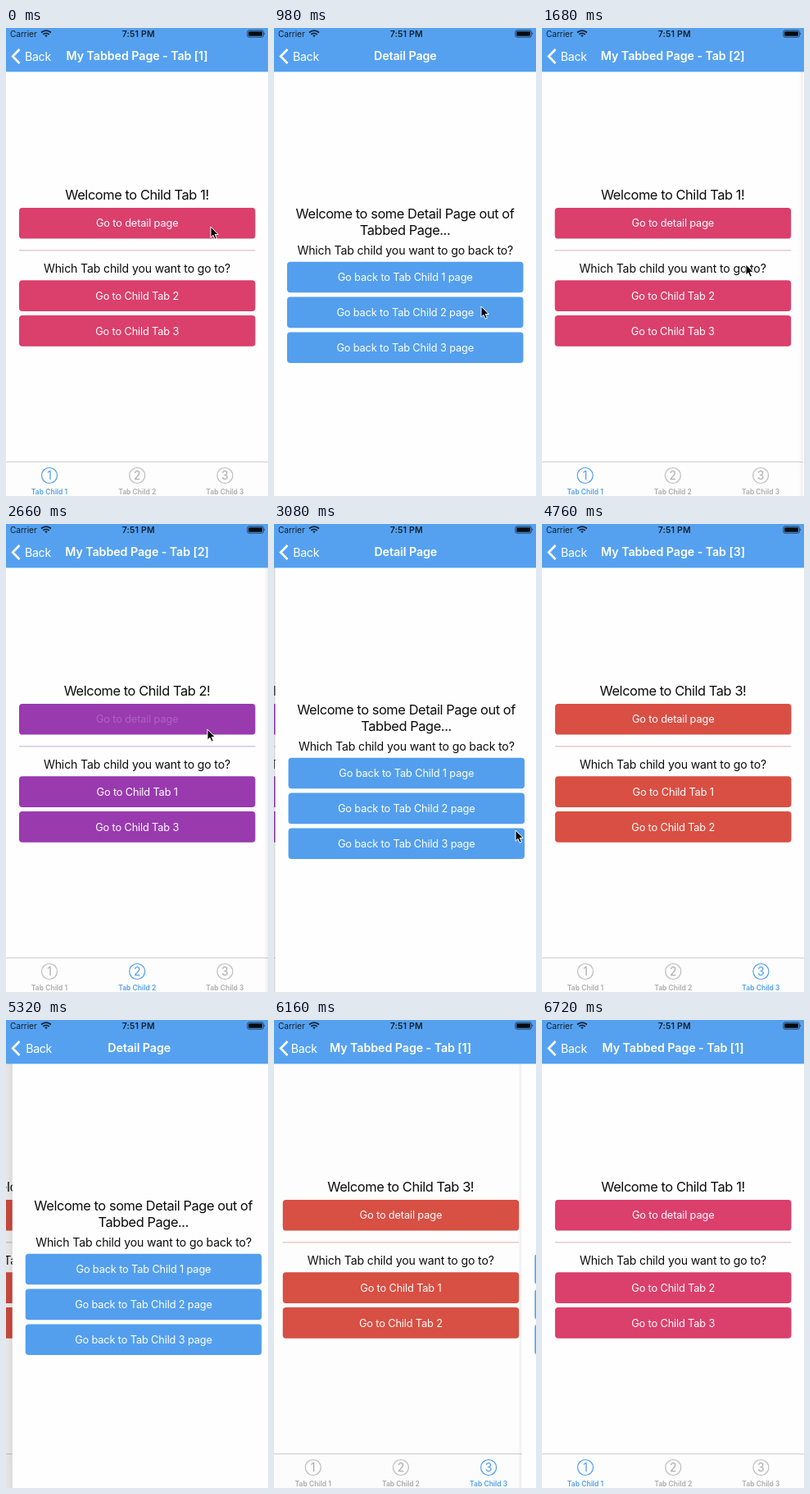
These frames come from a looping animation (320 px wide and 570 px high, 6790 ms). An HTML page:

```html
<!DOCTYPE html>
<html lang="en">
<head>
<meta charset="utf-8">
<title>Tabbed page navigation</title>
<style>
  html, body { margin: 0; width: 100%; height: 100%; overflow: hidden; background: #fefefe; }
  svg { display: block; width: 320px; height: 570px; }
  text { font-family: Inter, Roboto, sans-serif; text-anchor: middle; }
  .large { font-size: 16.4px; letter-spacing: -.42px; fill: #0c0c0c; }
  .body { font-size: 14.1px; letter-spacing: -.15px; fill: #0c0c0c; }
  .button { font-size: 12.8px; letter-spacing: -.15px; fill: #fff; }
  .title { font-size: 14.3px; font-weight: 600; letter-spacing: -.1px; fill: #fff; }
  .back { font-size: 14.2px; letter-spacing: -.32px; fill: #fff; text-anchor: start; }
  .status { font-size: 10.2px; letter-spacing: -.08px; fill: #14202c; }
  .tab { fill: #ababab; }
  .tab.on { fill: #519fec; }
  .tab circle { fill: none; stroke: #bdbdbd; stroke-width: 1.2; }
  .tab.on circle { stroke: #519fec; }
  .digit { font-size: 14px; }
  .label { font-size: 8.5px; font-weight: 600; }
</style>
</head>
<body>
<svg viewBox="0 0 320 570">
  <defs>
    <linearGradient id="shade">
      <stop offset="0" stop-color="#000" stop-opacity="0"/>
      <stop offset="1" stop-color="#000" stop-opacity=".06"/>
    </linearGradient>
  </defs>
  <rect width="320" height="570" fill="#fefefe"/>
  <g id="tabs"></g>
  <rect id="dim" width="320" height="570"/>
  <g id="detail"></g>

  <rect width="320" height="53.4" fill="#55a1f0"/>
  <text id="tabBack" class="back" y="39.5">Back</text>
  <text id="tabTitle" class="title" y="39.3"></text>
  <text id="detailBack" class="back" y="39.5">Back</text>
  <text id="detailTitle" class="title" y="39.3">Detail Page</text>
  <path d="M16.5 26 8.2 34.5 16.5 43" fill="none" stroke="#fff" stroke-width="2.7"/>

  <text class="status" x="21.3" y="10.7">Carrier</text>
  <g fill="none" stroke="#14202c" stroke-width="1.7">
    <path d="M43 5.5Q49 .6 55 5.5M45.2 7.9Q49 4.7 52.8 7.9"/>
    <path d="M47.2 9.2Q49 7.7 50.8 9.2L49 11Z" fill="#14202c" stroke="none"/>
  </g>
  <text class="status" x="161.7" y="10.8" style="font-size:10.5px;font-weight:600;letter-spacing:.15px">7:51 PM</text>
  <rect x="294.9" y="2.9" width="19.4" height="8.2" rx="2" fill="none" stroke="#14202c" stroke-width=".8"/>
  <rect x="296.2" y="4.2" width="16.8" height="5.6" rx="1" fill="#080c10"/>
  <path d="M315.4 5.4q1.6 1.6 0 3.2z" fill="#14202c"/>

  <path id="cursor" d="M0 0V13.2L3 10.4 5.1 15.2 7.4 14.2 5.3 9.5H9.3Z"
    fill="#080808" stroke="#fff" stroke-width="1" stroke-linejoin="round"/>
</svg>
<script>
  const LOOP = 6790, STEP = 70, SWITCH = 520;
  const COLORS = ['#db3f6c', '#993aaf', '#d94f43'];
  const LINES = ['#dfb0bd', '#c5acd6', '#e2b4af'];
  // each visit pushes the detail page from one tab and pops back to another
  const VISITS = [
    { push: 350, pop: 1240, from: 1, to: 2 },
    { push: 2660, pop: 3550, from: 2, to: 3 },
    { push: 5005, pop: 5900, from: 3, to: 1 }
  ];
  // cursor stops: time, x, y
  const STOPS = [
    [0, 250, 242], [450, 250, 242], [940, 253, 339], [1350, 253, 339],
    [1950, 246, 250], [2700, 246, 250], [3060, 295, 373], [3640, 295, 373]
  ];
  const $ = id => document.getElementById(id);

  const text = (cls, x, y, str) => `<text class="${cls}" x="${x}" y="${y}">${str}</text>`;
  const button = (y, color, str) =>
    `<rect x="16" y="${y}" width="288.5" height="37.6" rx="4" fill="${color}"/>` +
    text('button press', 160.2, y + 23.4, str);

  function tabBar(active) {
    const items = [1, 2, 3].map(n => {
      const x = 53 + (n - 1) * 107.2;
      return `<g class="tab${n === active ? ' on' : ''}"><circle cx="${x}" cy="545" r="9.5"/>` +
        text('digit', x, 550, n) + text('label', x, 568, 'Tab Child ' + n) + '</g>';
    });
    return '<rect y="528" width="320" height="42" fill="#fdfdfd"/>' +
      '<rect y="528" width="320" height="1" fill="#cdcdcd"/>' + items.join('');
  }

  function tabPage(n) {
    const color = COLORS[n - 1];
    const others = [1, 2, 3].filter(k => k !== n);
    return '<g>' + text('large', 160, 209.4, `Welcome to Child Tab ${n}!`) +
      button(219, color, 'Go to detail page') +
      `<rect x="16" y="270.4" width="288.5" height="1" fill="${LINES[n - 1]}"/>` +
      text('body', 160, 298.4, 'Which Tab child you want to go to?') +
      others.map((k, i) => button(307.3 + i * 42.8, color, 'Go to Child Tab ' + k)).join('') +
      tabBar(n) + '</g>';
  }

  $('tabs').innerHTML = [1, 2, 3].map(tabPage).join('');
  $('detail').innerHTML =
    '<rect x="-5" y="53" width="5" height="517" fill="url(#shade)"/>' +
    '<rect width="320" height="570" fill="#fefefe"/>' +
    text('large', 160, 232.4, 'Welcome to some Detail Page out of') +
    text('large', 160, 252.4, 'Tabbed Page...') +
    text('body', 160.3, 275.6, 'Which Tab child you want to go back to?') +
    [1, 2, 3].map(n => button(284.7 + (n - 1) * 42.9, '#539fee', `Go back to Tab Child ${n} page`)).join('');

  const pages = [...$('tabs').children];
  const tabPress = pages.map(p => p.querySelector('.press'));
  const detailPress = [...$('detail').querySelectorAll('.press')];

  const clamp = v => Math.min(1, Math.max(0, v));
  // critically damped spring, 0 to 1
  const spring = ms => {
    const x = Math.max(0, ms) * .0178;
    return 1 - (1 + x) * Math.exp(-x);
  };
  // label opacity around a tap
  const pressed = dt => dt < -90 ? 1 : .2 + .8 * clamp((dt - 70) / 250);
  // crossfade that settles slightly before the motion does
  const fade = v => clamp(v * 1.2 - .1);
  const place = (el, x, opacity) => {
    el.setAttribute('transform', `translate(${x} 0)`);
    el.setAttribute('opacity', opacity);
  };

  function moveCursor(t) {
    const i = STOPS.findIndex(s => s[0] > t);
    $('cursor').style.display = i < 0 ? 'none' : '';
    if (i < 0) return;
    const [t0, x0, y0] = STOPS[i - 1], [t1, x1, y1] = STOPS[i];
    const u = (t - t0) / (t1 - t0), e = u * u * (3 - 2 * u);
    $('cursor').setAttribute('transform', `translate(${x0 + (x1 - x0) * e} ${y0 + (y1 - y0) * e})`);
  }

  function draw(t) {
    let shown = 0, visiting = false, tab = 1, named = 1;
    tabPress.concat(detailPress).forEach(el => el.setAttribute('opacity', 1));
    for (const v of VISITS) {
      const done = t >= v.pop + SWITCH;
      visiting = t >= v.push && !done;
      if (visiting) shown = t < v.pop ? spring(t - v.push) : 1 - spring(t - v.pop);
      if (t >= v.pop) named = v.to;
      if (done) tab = v.to;
      if (t < v.pop) tabPress[v.from - 1].setAttribute('opacity', pressed(t - v.push));
      if (visiting) detailPress[v.to - 1].setAttribute('opacity', pressed(t - v.pop));
      if (!done) break;
    }
    if (shown > .998) shown = 1;
    if (!visiting) shown = 0;

    const hidden = 1 - shown;
    pages.forEach((p, i) => p.style.display = i + 1 === tab ? '' : 'none');
    place($('tabs'), -96 * shown, 1);
    $('dim').setAttribute('opacity', .1 * shown);
    place($('detail'), 320 * hidden, 1);
    $('detail').style.display = visiting ? '' : 'none';

    $('tabTitle').textContent = `My Tabbed Page - Tab [${named}]`;
    place($('tabTitle'), 160 - 100 * shown, fade(hidden));
    place($('tabBack'), 23 - 40 * shown, fade(hidden));
    place($('detailTitle'), 160.3 + 100 * hidden, fade(shown));
    place($('detailBack'), 23 + 50 * hidden, fade(shown));
    moveCursor(t);
  }

  const start = performance.now();
  function frame() {
    const t = (performance.now() - start) % LOOP;
    draw(Math.floor(t / STEP) * STEP);
    requestAnimationFrame(frame);
  }
  draw(0);
  requestAnimationFrame(frame);
</script>
</body>
</html>
```
